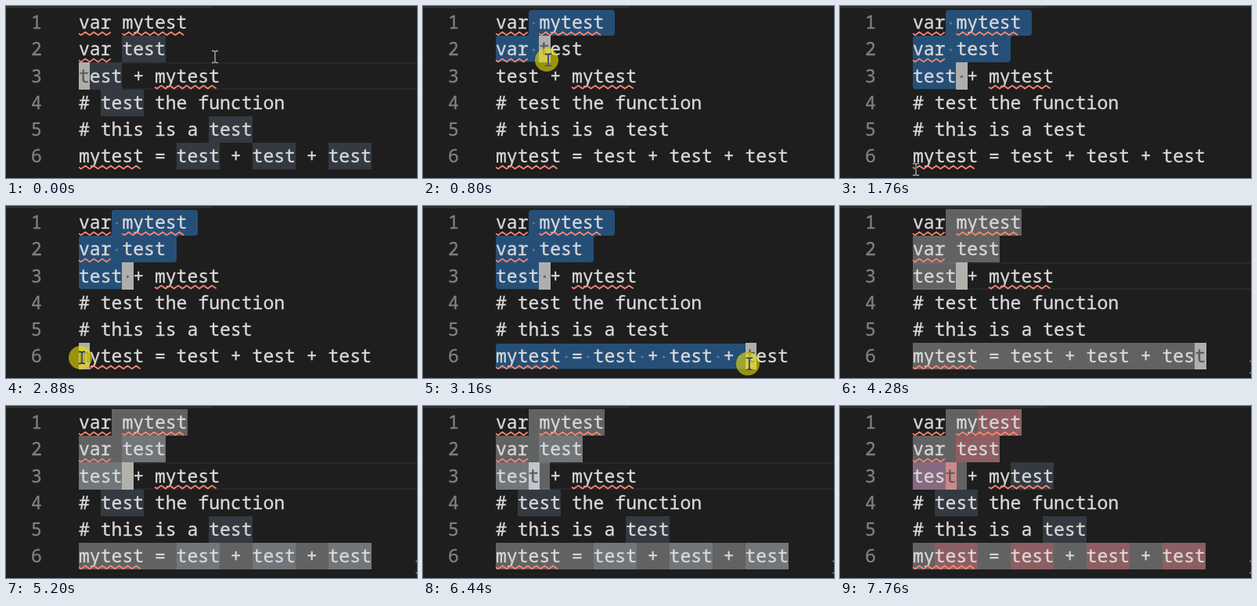
Write an HTML page that moves like this. It is 525x220 px and loops after 8 s.

```html
<!DOCTYPE html>
<html lang="en">
<head>
<meta charset="utf-8">
<title>Editor selections</title>
<style>
  html, body { margin: 0; width: 100%; height: 100%; overflow: hidden; background: #1e1e1e; }
  svg { display: block; width: 525px; height: 220px; }
  text { font: 23.08px "Noto Sans Mono", monospace; white-space: pre; stroke-width: .35; }
  #mouse { mix-blend-mode: difference; }
</style>
</head>
<body>
<svg viewBox="0 0 525 220">
  <rect width="525" height="220" fill="#1e1e1e"/>
  <rect width="525" height="2" fill="#252526"/>
  <rect width="264" height="3" fill="#2e2e2f"/>
  <g id="back"></g>
  <g id="code"></g>
  <g id="blocks"></g>
  <g id="waves" fill="none" stroke="#f48771" stroke-width="1.8"></g>
  <circle id="press" r="15" fill="#ebe100" fill-opacity=".6"/>
  <path id="mouse" d="M-4-7.5H-1.5L0-6.5L1.5-7.5H4M0-6.5V6.5M-4 7.5H-1.5L0 6.5L1.5 7.5H4" fill="none" stroke="#d0d0d0" stroke-width="1.3"/>
</svg>
<script>
const LOOP = 8000, STEP = 40, LEFT = 93, CHAR = 13.855, TOP = 4, ROW = 34.2;
const lines = [
  'var mytest', 'var test', 'test + mytest',
  '# test the function', '# this is a test', 'mytest = test + test + test'
];
// row, first column, length
const errors = [[0, 0, 3], [0, 4, 6], [1, 0, 3], [2, 7, 6], [5, 0, 6]];
// row, first column, end column
const regions = [[0, 3, 10], [1, 0, 8], [2, 0, 5], [5, 0, 27]];
// time, x, y
const path = [
  [0, 267, 65], [400, 136, 22], [800, 160, 69], [920, 160, 69], [1000, 161, 82],
  [1160, 161, 82], [1560, 97, 209], [1880, 97, 209], [2240, 97, 204], [2520, 97, 204],
  [2600, 97, 194], [2880, 97, 194], [3280, 505, 204], [3440, 505, 204], [3560, 527.5, 206]
];

const $ = id => document.getElementById(id);
const colX = c => LEFT + c * CHAR;
const rowY = r => TOP + r * ROW;
const within = (t, a, b) => t >= a && t < b;
const clamp = (v, a, b) => Math.max(a, Math.min(b, v));
const glyphs = (x, r, s, fill) =>
  `<text x="${x}" y="${rowY(r) + 25.2}" fill="${fill}" stroke="${fill}">${s}</text>`;

function box(r, from, to, fill) {
  const x = Math.round(colX(from)), y = Math.round(rowY(r));
  const w = Math.round(colX(to)) - x, h = Math.round(rowY(r + 1)) - y;
  return `<rect x="${x}" y="${y}" width="${w}" height="${h}" fill="${fill}"/>`;
}

function rounded(points) {
  const pts = points.filter((p, i) => {
    const q = points[(i + 1) % points.length];
    return Math.hypot(p[0] - q[0], p[1] - q[1]) > .1;
  });
  const toward = (a, b) => {
    const len = Math.hypot(b[0] - a[0], b[1] - a[1]), k = Math.min(4, len / 2) / len;
    return [a[0] + (b[0] - a[0]) * k, a[1] + (b[1] - a[1]) * k];
  };
  const n = pts.length;
  const d = pts.map((p, i) =>
    `${i ? 'L' : 'M'}${toward(p, pts[(i + n - 1) % n])}Q${p} ${toward(p, pts[(i + 1) % n])}`);
  return `<path d="${d.join('')}Z" fill="#264f78"/>`;
}

// Selection from (r0, c0) up to and including (r1, c1); full rows include the line break
function selection(r0, c0, r1, c1) {
  const x = c => Math.round(colX(c));
  const y = r => Math.round(rowY(r)) + (r === r0 ? 1 : r > r1 ? -.7 : 0);
  const pts = [[x(c0), y(r0)]];
  for (let r = r0; r <= r1; r++) {
    const end = x(r < r1 ? lines[r].length + 1 : c1 + 1);
    pts.push([end, y(r)], [end, y(r + 1)]);
  }
  if (r1 > r0) pts.push([LEFT, y(r1 + 1)], [LEFT, y(r0 + 1)]);
  pts.push([x(c0), y(r0 + 1)]);
  return rounded(pts);
}

function dots(r0, c0, r1, c1) {
  let out = '';
  for (let r = r0; r <= r1; r++) {
    const end = r < r1 ? lines[r].length : c1;
    for (let c = r === r0 ? c0 : 0; c < end; c++)
      if (lines[r][c] === ' ')
        out += `<circle cx="${colX(c + .5)}" cy="${rowY(r) + 18}" r="1.6" fill="#e3e4e2" fill-opacity=".3"/>`;
  }
  return out;
}

function block(r, c, fill, dot) {
  const ch = lines[r][c];
  const mark = ch !== ' ' ? glyphs(colX(c), r, ch, '#5c5c5c')
    : dot ? `<circle cx="${colX(c + .5)}" cy="${rowY(r) + 18}" r="1.6" fill="#666"/>` : '';
  return box(r, c, c + 1.04, fill) + mark;
}

function matches(whole) {
  const found = [];
  lines.forEach((s, r) => {
    for (const m of s.matchAll(whole ? /\btest\b/g : /test/g)) found.push([r, m.index, m.index + 4]);
  });
  return found;
}

function mouseAt(t) {
  const i = path.findIndex(p => p[0] > t);
  if (i < 0) return path[path.length - 1].slice(1);
  const [a, x, y] = path[i - 1], [b, u, v] = path[i];
  const k = (t - a) / (b - a), e = k * k * (3 - 2 * k);
  return [x + (u - x) * e, y + (v - y) * e];
}

// Zigzag of period 10.8 that starts halfway down
function wave(r, c, len) {
  const x = colX(c), end = colX(c + len), mid = rowY(r + 1) - 2.9;
  let d = `M${x} ${mid}`;
  for (let i = 0; x + 3 + i * 5.4 < end; i++)
    d += `L${x + 3 + i * 5.4} ${mid + (i % 2 ? -1.9 : 1.9)}`;
  return `<path d="${d}"/>`;
}

function draw(t) {
  const [mx, my] = mouseAt(t);
  const dragCol = max => clamp(Math.floor((mx - LEFT) / CHAR), 0, max);
  const selecting = within(t, 400, 4280);
  const searching = t >= 6640;
  let back = '', blocks = '';

  if (!selecting && !searching)
    for (const y of [rowY(2), rowY(3) - 2])
      back += `<rect x="${LEFT}" y="${Math.round(y)}" width="432" height="2" fill="#282828"/>`;

  if (t < 400 || within(t, 4720, 5760) || t >= 5920)
    for (const m of matches(!searching)) back += box(...m, '#343a41');

  if (selecting) {
    const row = clamp(Math.floor((my - TOP) / ROW), 0, 2);
    const [r, c] = t < 1160 ? [row, dragCol(lines[row].length)] : [2, 4];
    back += selection(0, 3, r, c);
    blocks += dots(0, 3, r, c) + block(r, c, '#aeafad', true);
    if (t >= 2880) {
      const last = t < 3440 ? dragCol(26) : 26;
      back += selection(5, 0, 5, last);
      blocks += dots(5, 0, 5, last) + block(5, last, '#aeafad', true);
    }
  } else if (t < 400) {
    blocks += block(2, 0, '#aeafad');
  } else if (t < 5760) {
    if (t < 4440) blocks += block(5, 26, '#aeafad');
    if (!within(t, 4880, 5200) && t < 5560) blocks += block(2, 4, '#b2b2ac');
  } else if (!within(t, 6200, 6440)) {
    blocks += block(2, 3, t < 7160 ? '#bfc6cc' : '#cb8a86');
  }

  if (searching) back += box(2, 0, 4, '#264f78');
  if (t >= 4000) for (const g of regions) back += box(...g, 'rgba(255,255,255,.3)');
  if (t >= 7160)
    for (const m of matches(false))
      if (regions.some(g => g[0] === m[0] && m[2] <= g[2])) back += box(...m, 'rgba(255,0,0,.2)');

  $('back').innerHTML = back;
  $('blocks').innerHTML = blocks;
  $('mouse').setAttribute('transform', `translate(${mx} ${my})`);
  const press = $('press');
  press.setAttribute('cx', mx - 2);
  press.setAttribute('cy', my);
  press.style.display = within(t, 400, 1200) || within(t, 2880, 3480) ? '' : 'none';
}

$('code').innerHTML = lines.map((s, r) =>
  glyphs(32, r, r + 1, '#808080') + glyphs(LEFT, r, s, '#d8d8d8')).join('');
$('waves').innerHTML = errors.map(e => wave(...e)).join('');

const start = performance.now();
let shown = -1;
function tick() {
  const t = Math.floor((performance.now() - start) % LOOP / STEP) * STEP;
  if (t !== shown) draw(shown = t);
  requestAnimationFrame(tick);
}
tick();
</script>
</body>
</html>
```
